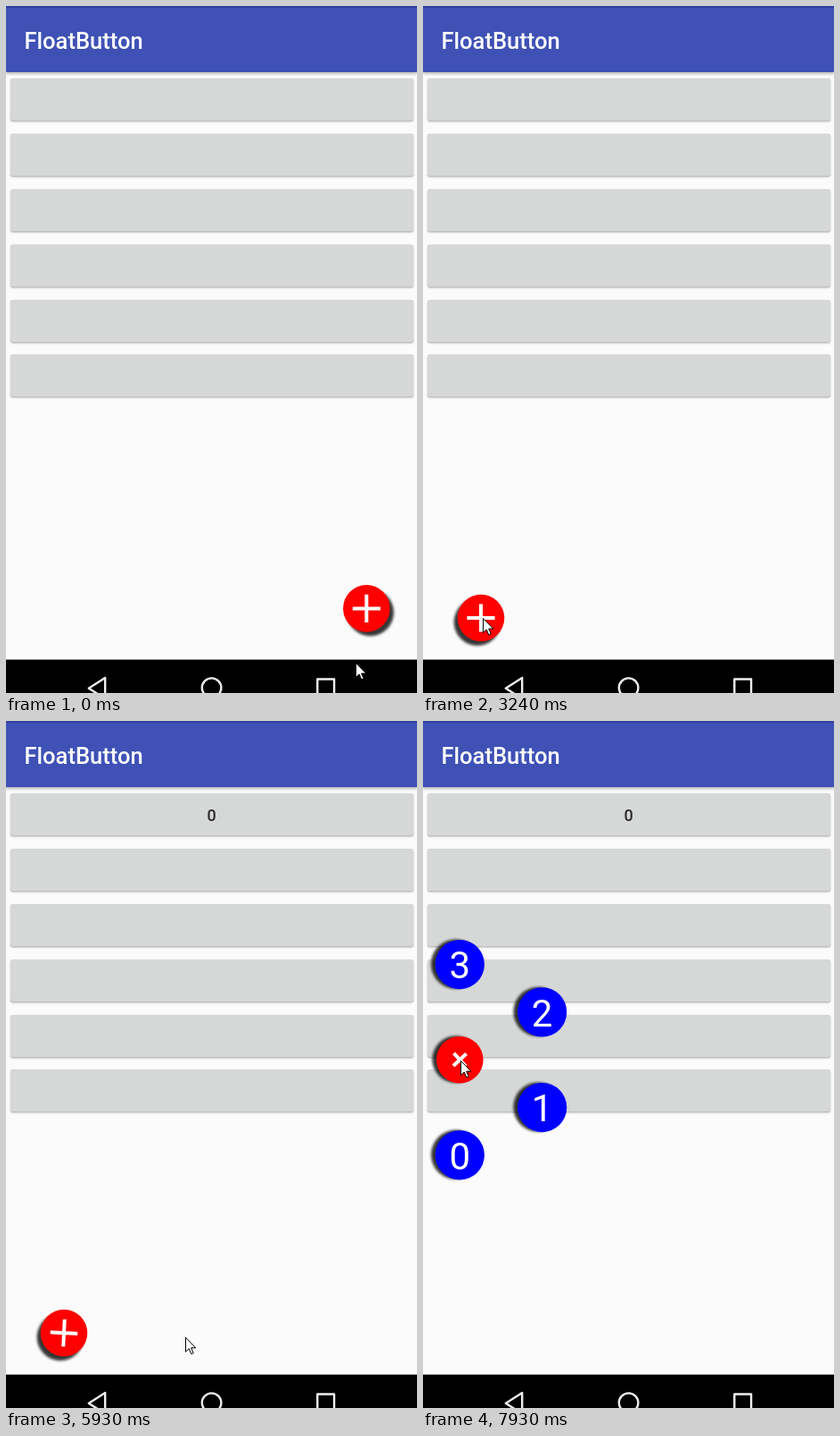
Write an HTML page that moves like this. It is 461 px wide and 769 px high and loops after 8000 ms.

```html
<!DOCTYPE html>
<html lang="en">
<head>
<meta charset="utf-8">
<title>FloatButton</title>
<style>
  html, body { margin: 0; width: 100%; height: 100%; overflow: hidden; background: #fbfbfb; }
  body { position: relative; font-family: Roboto, sans-serif; }
  .bar {
    position: absolute; left: 0; top: 0; width: 461px; height: 74px; box-sizing: border-box;
    background: #3f51b5; border-top: 2px solid #303f9f;
    box-shadow: 0 2px 3px rgba(0, 0, 0, .28);
    color: #fff; font-size: 25.6px; font-weight: 500; line-height: 74px; text-indent: 20.4px;
  }
  .row {
    position: absolute; left: 4.5px; width: 452px; height: 47px; border-radius: 2.5px;
    background: #d6d7d7;
    box-shadow: 0 1.5px 2px rgba(0, 0, 0, .27), 0 0 1px rgba(0, 0, 0, .12);
    font-size: 18px; font-weight: 500; line-height: 49px; text-align: center; color: #2a2a2a;
  }
  svg { position: absolute; left: 0; top: 0; }
  .digit { font: 40px Roboto, sans-serif; fill: #fff; text-anchor: middle; }
</style>
</head>
<body>
<div class="bar">FloatButton</div>
<svg id="stage" width="461" height="769" viewBox="0 0 461 769">
  <defs>
    <filter id="soft" x="-30%" y="-30%" width="160%" height="160%"><feGaussianBlur stdDeviation="1.4"/></filter>
  </defs>
  <rect y="731.6" width="461" height="38"/>
  <g fill="none" stroke="#eee" stroke-width="2.4" stroke-linejoin="round">
    <path d="M111.2 752L92.8 763.7L111.2 775.4Z"/>
    <circle cx="230.6" cy="763.2" r="10.8"/>
    <rect x="349.3" y="753.5" width="18.8" height="18.8"/>
  </g>
  <g id="menu"></g>
  <path id="cursor" d="M0 0V16L3.7 12.5L6.3 18.5L8.7 17.4L6.2 11.6H11.3Z" fill="#fff" stroke="#000"/>
</svg>
<script>
const LOOP = 8000, SPAN = 500, R = 26.3;

// Taps open and close the menu in turn
const taps = [1020, 2068, 3410, 4320, 5164, 5785, 7525];

// Moves: [begin, end, x, y]
const pointer = { from: [392, 735], moves: [
  [60, 150, 382, 707], [150, 280, 397, 688], [450, 590, 398, 677],
  [2600, 3100, 67, 685], [3560, 4020, 126, 564], [4450, 5080, 67, 688],
  [5200, 5330, 174, 706], [5330, 5560, 217, 690], [5900, 6470, 66, 686],
  [6600, 6690, 62, 588], [6690, 7200, 42, 380]
] };
const button = { from: [404.4, 674.4], moves: [
  [2620, 3200, 65, 685], [6640, 6690, 58, 661], [6690, 7330, 41.3, 379.2]
] };

const $ = id => document.getElementById(id);
const clamp = k => Math.min(1, Math.max(0, k));

function make(tag, parent, attrs = {}) {
  const el = document.createElementNS('http://www.w3.org/2000/svg', tag);
  for (const k in attrs) el.setAttribute(k, attrs[k]);
  return parent.appendChild(el);
}

const rows = Array.from({ length: 6 }, (_, i) => {
  const row = document.createElement('div');
  row.className = 'row';
  row.style.top = 81.3 + i * 61.8 + 'px';
  document.body.insertBefore(row, $('stage'));
  return row;
});

function disc(color) {
  const g = make('g', $('menu'));
  return {
    g,
    shadow: make('circle', g, { r: R, fill: '#000', opacity: .78, filter: 'url(#soft)' }),
    face: make('circle', g, { r: R, fill: color })
  };
}
const items = [0, 1, 2, 3].map(n => {
  const item = disc('#00f');
  item.label = make('text', item.g, { class: 'digit', y: 15 });
  item.label.textContent = n;
  return item;
});
const main = disc('#f00');
const cross = make('path', main.g, { stroke: '#fff', 'stroke-width': 4 });

function locate({ from, moves }, t) {
  let [x, y] = from;
  for (const [begin, end, toX, toY] of moves) {
    const left = (1 - clamp((t - begin) / (end - begin))) ** 2;
    x = toX + (x - toX) * left;
    y = toY + (y - toY) * left;
  }
  return [x, y];
}

function overshoot(k) {
  const u = k - 1;
  return u * u * (3 * u + 2) + 1;
}

function openness(t) {
  const count = taps.filter(tap => tap <= t).length;
  if (!count) return 0;
  const k = overshoot(clamp((t - taps[count - 1]) / SPAN));
  return count % 2 ? k : 1 - k;
}

// Quarter circle in a lower corner, half circle along the left edge
function fan(x, y) {
  if (y < 600) return { radius: 101.5, first: 90, arc: 180 };
  return { radius: 154, first: x > 230 ? -90 : 0, arc: 90 };
}

function place(d, x, y, s, dx, dy) {
  d.g.setAttribute('transform', `translate(${x} ${y})`);
  d.shadow.setAttribute('transform', `translate(${dx} ${dy}) scale(${s})`);
  d.face.setAttribute('transform', `scale(${s})`);
}

function draw(t) {
  const [x, y] = locate(button, t), [px, py] = locate(pointer, t);
  const p = openness(t), { radius, first, arc } = fan(x, y);
  // Light sits at the middle of the screen
  const dx = (x - 230) / 41, dy = (y - 403) / 60;

  items.forEach((item, i) => {
    const a = (first - arc * i / 3) * Math.PI / 180, r = radius * p;
    item.g.style.display = p > .02 ? '' : 'none';
    place(item, x + r * Math.cos(a), y + r * Math.sin(a), p, dx, dy);
    item.label.setAttribute('transform', `scale(${p})`);
  });

  place(main, x, y, 1, dx, dy);
  const h = 15.6 - 5.4 * p;
  cross.setAttribute('d', `M${-h} 0H${h}M0 ${-h}V${h}`);
  cross.setAttribute('transform', `rotate(${45 * p})`);

  $('cursor').setAttribute('transform', `translate(${px + .5} ${py + .5})`);
  const chosen = t - 65;
  rows[0].textContent = chosen < taps[3] ? '' : chosen < taps[5] ? '2' : '0';
}

const start = performance.now();
function tick() {
  draw((performance.now() - start) % LOOP);
  requestAnimationFrame(tick);
}
tick();
</script>
</body>
</html>
```
